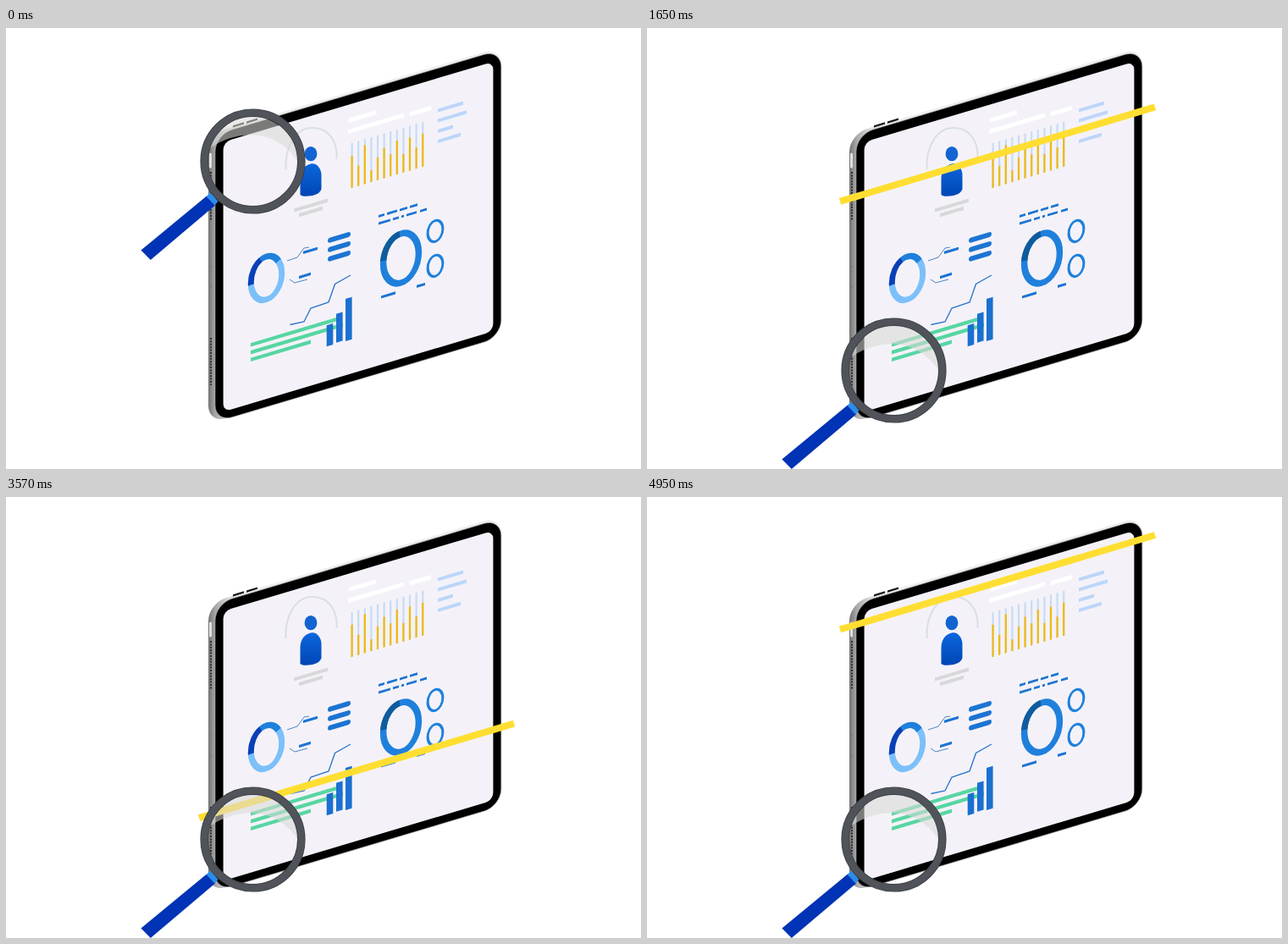
An HTML page that plays this animation: 750x521 px, repeating every 5180 ms.

```html
<!DOCTYPE html>
<html lang="en">
<head>
<meta charset="utf-8">
<title>Tablet scan</title>
<style>
html, body { margin: 0; width: 100%; height: 100%; overflow: hidden; background: #fff; }
svg { display: block; width: 750px; height: 521px; }
</style>
</head>
<body>
<svg viewBox="0 0 750 521" fill="none">
  <defs>
    <linearGradient id="metal" gradientUnits="userSpaceOnUse" x1="239" x2="300" y1="0" y2="0">
      <stop offset="0" stop-color="#737373"/>
      <stop offset=".13" stop-color="#a6a6a6"/>
      <stop offset=".4" stop-color="#dcdcdc"/>
      <stop offset="1" stop-color="#eee"/>
    </linearGradient>
    <linearGradient id="person" x2="0" y2="1">
      <stop stop-color="#0c66dc"/>
      <stop offset="1" stop-color="#0046b4"/>
    </linearGradient>
  </defs>

  <!-- Everything in this group lies in the slanted plane of the tablet -->
  <g transform="matrix(1 -.298 0 1 0 0)">
    <rect x="239" y="196.6" width="346.3" height="342" rx="21" fill="url(#metal)"/>
    <rect x="247" y="199.6" width="337.8" height="339.8" rx="20" fill="#000" stroke="#a8a8a8" stroke-width=".6"/>
    <rect x="256.6" y="211.2" width="318.8" height="318.6" rx="9" fill="#f4f2f8"/>
    <path d="M268 196.2h13M284 196.2h13" stroke="#111" stroke-width="2.2"/>

    <path d="M340 316.8h40M346 324.3h28" stroke="#d8d8da" stroke-width="4.2"/>
    <path d="M405 230h32M404 243h66M477 244h25" stroke="#fff" stroke-width="5"/>
    <path d="M510 249.5h30M510 261.5h34M510 274h18M510 286h27" stroke="#bcd6fa" stroke-width="4.2"/>
    <g id="chart" stroke-width="2.2"></g>

    <g stroke="#1c74d2">
      <path d="M440 353.6h7m3 0h12m3 0h9m3 0h9M440 362.1h14m3 0h7m3 0h3m3 0h12m4 0h8" stroke-width="2.8"/>
      <path d="M443 450h17M485 450h10M351 370h17M346 397.7h14" stroke-width="3.2"/>
      <path d="M383 364.6h21M383 375.6h21M383 386.6h21" stroke-width="6" stroke-linecap="round"/>
    </g>

    <g stroke="#1f80dc">
      <g stroke-width="7.5">
        <ellipse cx="466.5" cy="411" rx="20.9" ry="29.1"/>
        <ellipse cx="466.5" cy="411" rx="20.9" ry="29.1" pathLength="100" stroke="#0f5c9c" stroke-dasharray="22 78" stroke-dashoffset="-52"/>
      </g>
      <g stroke-width="3">
        <ellipse cx="507" cy="391" rx="8.9" ry="12.4"/>
        <ellipse cx="507" cy="432" rx="8.9" ry="12.4"/>
      </g>
      <g stroke-width="7">
        <ellipse cx="307.5" cy="387.1" rx="18.2" ry="25.4" stroke="#7cc0fa"/>
        <ellipse cx="307.5" cy="387.1" rx="18.2" ry="25.4" pathLength="100" stroke-dasharray="18 82" stroke-dashoffset="-70"/>
        <ellipse cx="307.5" cy="387.1" rx="18.2" ry="25.4" pathLength="100" stroke="#0a3fb8" stroke-dasharray="22 78" stroke-dashoffset="-48"/>
      </g>
    </g>

    <path d="M289 460.5h102M289 469.3h109M289 478h71" stroke="#56d6a2" stroke-width="4.4"/>
    <path d="M382.5 464v25M393.8 454v34M404.8 439.5v50" stroke="#1b70d0" stroke-width="7.6"/>
  </g>

  <path d="M241.5 149v15" stroke="#e0e0e0" stroke-width="3" stroke-linecap="round"/>
  <path d="M242 170v57M242 366v56" stroke="#222" stroke-width="1.8" stroke-dasharray="2 1.4"/>
  <path d="M242 281v2M242 305v2" stroke="#777" stroke-width="1.5"/>

  <path d="M330.5 167C329 140 343 118 361 118C380 117 392 133 390.5 155" stroke="#d9dfe2" stroke-width="2"/>
  <ellipse cx="360" cy="148.7" rx="7.4" ry="8.6" fill="#1264d2"/>
  <path d="M347.5 197V178C347.5 168 353 162 360 160.5C367 159 372.5 166 372.5 174V190Q372 195 362 198Q350 200 347.5 197Z" fill="url(#person)"/>
  <path d="M332 275L344 271L352 260L358 259M335 297L341 301L356 297" stroke="#4a86c8"/>
  <path d="M335.5 350.5L352 347L360 331L381 324L388.5 302.5L407 292" stroke="#2f78cc" stroke-width="1.4"/>

  <path id="beam" d="M228 156.5L600 45" stroke="#ffde32" stroke-width="8"/>

  <g id="lens">
    <path d="M241 142A53 53 0 0 1 344.5 157Q320 124 285 126.5Q260 128 241 142Z" fill="#d9d9d7" fill-opacity=".56"/>
    <path d="M159.4 262.6L237 198.4L247 209.4L170.8 274Z" fill="#0033b5"/>
    <path d="M236.6 199L241.5 194.5L250.5 204.8L246.4 209.4Z" fill="#2a8cec"/>
    <circle cx="291.5" cy="157.5" r="57.3" stroke="#3d4045" stroke-width="9.6"/>
    <circle cx="291.5" cy="157.5" r="57.3" stroke="#50545a" stroke-width="7.8"/>
  </g>
</svg>
<script>
const LOOP = 5180, STEP = 30;
const LENS_END = 1350, BEAM_TURN = 3150, BEAM_END = 4950;
const LENS_TRAVEL = 247, BEAM_TRAVEL = 290.3;
const lens = document.getElementById('lens');
const beam = document.getElementById('beam');

const levels = [38, 24, 46, 14, 27, 36, 26, 40, 22, 39, 25, 39];
document.getElementById('chart').innerHTML = levels.map((h, i) => {
  const x = 408.6 + i * 7.6;
  return `<path d="M${x} 257.6v53" stroke="#c6dcf6"/><path d="M${x} 310.6v${-h}" stroke="#f0b90e"/>`;
}).join('');

const shift = (el, y) => el.setAttribute('transform', `translate(0 ${y})`);

function draw(now) {
  const t = Math.min(Math.floor(now % LOOP / STEP) * STEP, BEAM_END);
  shift(lens, LENS_TRAVEL * Math.min(t / LENS_END, 1));
  // The beam appears when the lens stops, sweeps down and returns
  beam.style.display = t < LENS_END ? 'none' : '';
  shift(beam, BEAM_TRAVEL * (1 - Math.abs(t - BEAM_TURN) / (BEAM_TURN - LENS_END)));
}

const start = performance.now();
function frame() {
  draw(performance.now() - start);
  requestAnimationFrame(frame);
}
frame();
</script>
</body>
</html>
```
